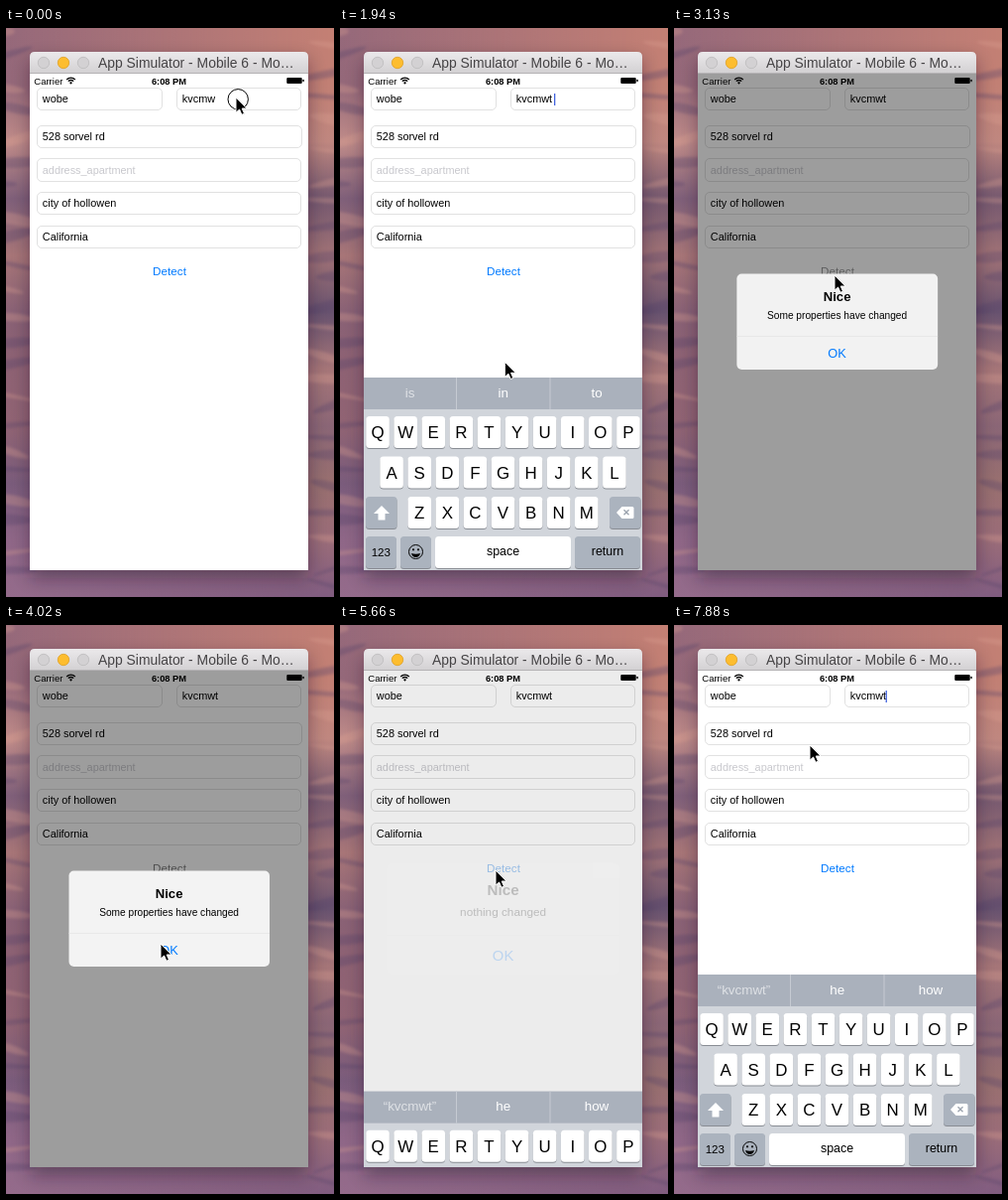
Animation of 331x573 px, one loop 8000 ms. Source, as an HTML page:

```html
<!DOCTYPE html>
<html lang="en">
<head>
<meta charset="utf-8">
<title>Form change detection</title>
<style>
  html, body { margin: 0; width: 100%; height: 100%; overflow: hidden; }
  svg { display: block; width: 331px; height: 573px; }
  text { font-family: "Liberation Sans", Arial, sans-serif; white-space: pre; }
</style>
</head>
<body>
<svg id="stage" viewBox="0 0 331 573" xmlns="http://www.w3.org/2000/svg"></svg>
<script>
const LOOP = 8000, TICK = 148.8;
const stage = document.getElementById('stage');

const text = (x, y, size, str, attrs = '') =>
  `<text x="${x}" y="${y}" font-size="${size}" ${attrs}>${str}</text>`;
const middle = (x, y, size, str, attrs = '') =>
  text(x, y, size, str, `text-anchor="middle" ${attrs}`);
const rect = (x, y, w, h, r, attrs) =>
  `<rect x="${x}" y="${y}" width="${w}" height="${h}" rx="${r}" ${attrs}/>`;
const field = (x, y, w, h, str, attrs = '') =>
  rect(x, y, w, h, 4.5, 'fill="#fff" stroke="#e1e1e1"') +
  text(x + 5.3, y + h / 2 + 3.6, 10.9, str, attrs);
const gradient = (id, colors, attrs = 'x2="0" y2="1"') =>
  `<linearGradient id="${id}" ${attrs}>${colors.split(' ').map((color, i, all) =>
    `<stop offset="${i / (all.length - 1)}" stop-color="${color}"/>`).join('')}</linearGradient>`;

function seeded(seed) {
  return () => {
    seed = (seed * 16807) % 2147483647;
    return seed / 2147483647;
  };
}

// Two tall gradients blended sideways, with soft random streaks on top.
function wallpaper() {
  const random = seeded(11);
  const streaks = Array.from({ length: 44 }, (_, i) => {
    const x = i % 2 * 331 + random() * 24 - 12, y = i * 13 + random() * 10;
    const color = random() < .5 ? '#dba092' : '#54426a';
    return `<ellipse cx="${x}" cy="${y}" rx="${20 + random() * 20}" ry="${2 + random() * 4}" fill="${color}"
      transform="rotate(${random() * 40 - 20} ${x} ${y})"/>`;
  });
  return rect(0, 0, 331, 573, 0, 'fill="url(#west)"') +
    rect(0, 0, 331, 573, 0, 'fill="url(#east)" mask="url(#blend)"') +
    `<g opacity=".32" filter="url(#soft)">${streaks.join('')}</g>`;
}

function titleBar() {
  const light = (x, fill, edge) =>
    `<circle cx="${x}" cy="35" r="5.7" fill="${fill}" stroke="${edge}" stroke-width=".8"/>`;
  return '<path d="M24 46V29q0-5 5-5H300q5 0 5 5V46Z" fill="url(#chrome)"/>' +
    rect(24, 45, 281, 1, 0, 'fill="#b5b3b5"') +
    light(38, '#d3d1d3', '#bdbbbd') + light(58, '#fdbd2f', '#dfa023') + light(78, '#d3d1d3', '#bdbbbd') +
    text(93, 40, 13.9, 'App Simulator - Mobile 6 - Mo…', 'fill="#454345"');
}

function statusBar() {
  const arc = r => `<path d="M${65.5 - r * .72} ${56.2 - r * .7}a${r} ${r} 0 0 1 ${r * 1.44} 0" fill="none" stroke="#000" stroke-width="1.3"/>`;
  return text(28.3, 56.8, 9.5, 'Carrier') + middle(164.5, 56.8, 9.3, '6:08 PM', 'font-weight="bold"') +
    arc(6) + arc(3.7) + '<path d="M65.5 56.8l-1.5-1.8q1.5-1.3 3 0Z"/>' +
    rect(283.3, 50, 15.4, 6, 1, '') + rect(299.4, 51.7, 1.3, 2.6, .6, '');
}

const form = () =>
  field(31.5, 60.5, 126, 22, 'wobe') +
  field(172.5, 60.5, 125, 22, '<tspan id="name"></tspan>') +
  field(31.5, 98.5, 267, 22, '528 sorvel rd') +
  field(31.5, 131.5, 266, 23, 'address_apartment', 'fill="#c8c8cd"') +
  field(31.5, 165.5, 266, 22, 'city of hollowen') +
  field(31.5, 199.5, 266, 22, 'California') +
  rect(0, 66, 1.3, 12, 0, 'id="caret" fill="#4263dd"') +
  middle(165, 248.6, 11.7, 'Detect', 'id="detect"');

function keyboard() {
  const grey = '#abb3be';
  const cap = (x, y, w, fill) =>
    rect(x, y + 1, w, 32, 3.5, 'fill="#898d94"') + rect(x, y, w, 32, 3.5, `fill="${fill}"`);
  const rows = ['QWERTYUIOP', 'ASDFGHJKL', 'ZXCVBNM'].map((letters, r) =>
    [...letters].map((letter, i) => {
      const x = 164.5 + (i - (letters.length - 1) / 2) * 28.1, y = 391 + r * 40.5;
      return cap(x - 11.8, y, 23.6, '#fff') + middle(x, y + 22, 16.9, letter);
    }).join('')).join('');
  const words = id => `<g id="${id}" fill="#fff">` +
    [70.5, 164.8, 259].map((x, i) => middle(x, 371.5, 13.4, '', i ? '' : 'fill-opacity=".62"')).join('') + '</g>';
  return rect(24, 352, 281, 194, 0, 'fill="#d1d5db"') +
    rect(24, 352, 281, 32, 0, 'fill="#aab1bc"') +
    rect(117, 352, 1, 32, 0, 'fill="#c5cad2"') + rect(211.5, 352, 1, 32, 0, 'fill="#c5cad2"') +
    words('oldWords') + words('newWords') + rows +
    cap(26, 472, 31.5, grey) + cap(272, 472, 31.5, grey) +
    '<path d="M42 481l8 8h-4.5v6.5h-7V489H34Z" fill="#fff"/>' +
    '<path d="M279 488l5.5-6H295q1.5 0 1.5 1.5v9q0 1.5-1.5 1.5H284.5Z" fill="#fff"/>' +
    '<path d="M286.5 485.3l5 5m0-5l-5 5" stroke="#9aa2ad" stroke-width="1.3"/>' +
    cap(26, 512, 31, grey) + middle(41.3, 531.5, 11.6, '123') +
    cap(61, 512, 31, grey) +
    '<circle cx="76.5" cy="527.5" r="7" fill="none" stroke="#000"/>' +
    '<path d="M72 529q4.5 1.5 9 0q-1 4-4.5 4t-4.5-4Z"/>' +
    '<circle cx="74" cy="525.3" r="1.1"/><circle cx="79" cy="525.3" r="1.1"/>' +
    cap(96, 512, 137, '#fff') + middle(164.5, 531, 12.4, 'space') +
    cap(237, 512, 66, grey) + middle(270, 531, 12.4, 'return');
}

const alertBox = () =>
  rect(63.5, 247.5, 202.5, 96.5, 5, 'fill="#f3f3f3"') +
  rect(63.5, 310, 202.5, .8, 0, 'fill="#e6e6e6"') +
  middle(164.6, 275, 13.1, 'Nice', 'font-weight="bold"') +
  middle(164.6, 293.2, 10.15, '', 'id="message"') +
  middle(164.6, 332, 12.8, 'OK', 'fill="#007aff"');

stage.innerHTML = `
<defs>
  ${gradient('west', '#96697b #94687a #c08c8a #80607a #a87678 #8a6276 #8e6274 #916474 #7a5c7c #8f6788 #956c8c')}
  ${gradient('east', '#c48074 #c28074 #bf877f #74586f #a07276 #67526f #a67678 #8a6676 #99706f #9a6c78 #805c80')}
  ${gradient('blend-x', '#000 #fff', '')}
  ${gradient('chrome', '#ebe9eb #d2d0d2')}
  <mask id="blend">${rect(0, 0, 331, 573, 0, 'fill="url(#blend-x)"')}</mask>
  <filter id="soft" x="-20%" y="-20%" width="140%" height="140%"><feGaussianBlur stdDeviation="1.5"/></filter>
  <filter id="shade" x="-20%" y="-20%" width="140%" height="140%"><feGaussianBlur stdDeviation="9"/></filter>
  <clipPath id="screen"><rect x="24" y="46" width="281" height="500"/></clipPath>
</defs>
${wallpaper()}
${rect(24, 32, 281, 522, 4, 'fill="#180c20" opacity=".4" filter="url(#shade)"')}
${titleBar()}
<g clip-path="url(#screen)">
  ${rect(24, 46, 281, 500, 0, 'fill="#fff"')}
  ${statusBar()}${form()}
  ${rect(24, 46, 281, 500, 0, 'id="dim"')}
  <g id="keyboard">${keyboard()}</g>
  <g id="alert">${alertBox()}</g>
</g>
<g id="cursor">
  <circle id="touch" cx="2.2" cy="1.8" r="10.2" fill="none" stroke="#000"/>
  <path d="M0 0V15.2L3.6 12L5.9 17.3L8.5 16.2L6.2 11H11Z" stroke="#fff"/>
</g>`;

const el = Object.fromEntries([...stage.querySelectorAll('[id]')].map(node => [node.id, node]));

const RAMP = 2.1, TRAVEL = 4.6, BLINK = 3.36;
const STOPS = [
  { tap: 0, arrive: 0, x: 232, y: 70 },
  { tap: 9, arrive: 6, x: 168, y: 370 },
  { tap: 19, arrive: 16, x: 162, y: 249 },
  { tap: 29, arrive: 27, x: 156, y: 321 },
  { tap: 37, arrive: 36, x: 157, y: 247 },
  { tap: 46, arrive: 43, x: 156, y: 333 },
  { arrive: 53, x: 137, y: 121 },
];
const FOCUS = [0, 28, 45], BLUR = [18.4, 36.8];
const PICK = STOPS[1].tap, DETECT = [STOPS[2].tap, STOPS[4].tap];

const smooth = u => {
  u = Math.max(0, Math.min(1, u));
  return u * u * (3 - 2 * u);
};
const sum = (starts, tick) => starts.reduce((total, s) => total + smooth((tick - s) / RAMP), 0);

function cursorAt(tick) {
  return STOPS.reduce((at, stop) => {
    const u = smooth((tick - stop.arrive) / TRAVEL + 1);
    return { x: at.x + (stop.x - at.x) * u, y: at.y + (stop.y - at.y) * u };
  }, STOPS[0]);
}

function setWords(group, words, opacity) {
  [...group.children].forEach((node, i) => { node.textContent = words[i]; });
  group.setAttribute('opacity', opacity);
}

function render(time) {
  const tick = Math.floor((time + 12) / TICK);
  const chosen = tick >= PICK, second = tick >= DETECT[1];

  // Every blur raises the alert a moment later; every later focus dismisses it.
  const typing = sum(FOCUS, tick) - sum(BLUR, tick);
  const opened = sum(BLUR.map(t => t + .6), tick);
  const shown = opened - sum(FOCUS.slice(1), tick);
  const zoom = 1.2 - .2 * (opened - second);

  el.name.textContent = chosen ? 'kvcmwt' : 'kvcmw';
  const focus = [...FOCUS, PICK].filter(t => t <= tick).sort((a, b) => a - b).pop();
  const blink = Math.floor((tick - focus - 1) / BLINK) % 2 === 0;
  const focused = tick > focus && !DETECT.some(t => t <= tick && t > focus);
  el.caret.setAttribute('x', !chosen ? 211 : focus === PICK ? 216 : 213.6);
  el.caret.setAttribute('opacity', +(focused && blink));

  const mix = (a, b) => Math.round(a + (b - a) * shown);
  const age = Math.min(...DETECT.map(t => tick < t ? 3 : tick - t));
  el.detect.setAttribute('fill', `rgb(${mix(0, 125)},${mix(122, 125)},${mix(255, 125)})`);
  el.detect.setAttribute('opacity', Math.min(1, .2 + .3 * age));

  el.keyboard.setAttribute('transform', `translate(0 ${194 * (1 - typing)})`);
  const fade = smooth((tick - DETECT[0] + .8) / 1.6);
  setWords(el.oldWords, chosen ? ['is', 'in', 'to'] : ['“kvcmw”', 'kvcmwt', ''], (1 - fade) * .7 + .3 * (fade === 0));
  setWords(el.newWords, ['“kvcmwt”', 'he', 'how'], fade < 1 ? fade * .7 : 1);

  el.dim.setAttribute('opacity', shown * .385);
  el.alert.setAttribute('opacity', shown);
  el.alert.setAttribute('transform', `translate(164.6 296) scale(${zoom}) translate(-164.6 -296)`);
  el.message.textContent = second ? 'nothing changed' : 'Some properties have changed';

  const { x, y } = cursorAt(tick);
  el.cursor.setAttribute('transform', `translate(${x} ${y})`);
  el.touch.setAttribute('opacity', +STOPS.some(stop => stop.tap === tick));
}

const start = performance.now();
function loop() {
  render((performance.now() - start) % LOOP);
  requestAnimationFrame(loop);
}
loop();
</script>
</body>
</html>
```
